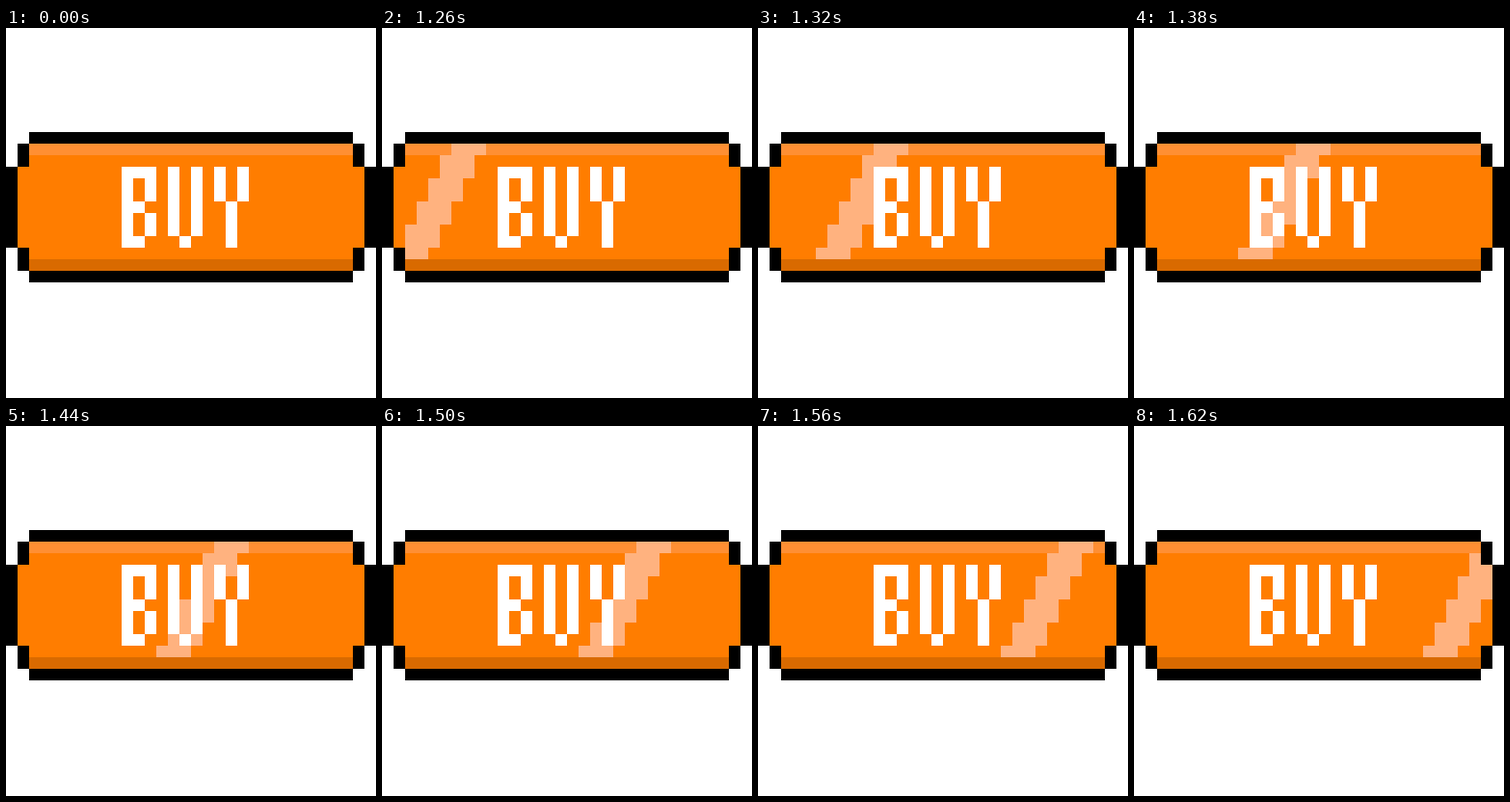
These frames come from a looping animation (384 px wide and 384 px high, 1680 ms). An HTML page:

```html
<!DOCTYPE html>
<html lang="en">
<head>
<meta charset="utf-8">
<title>Buy button</title>
<style>
  html, body { margin: 0; width: 100%; height: 100%; overflow: hidden; background: #fff; }
  svg { display: block; width: 100%; height: 100%; }
</style>
</head>
<body>
<!-- One unit is one big pixel: the stage is 32 by 32. -->
<svg viewBox="0 0 32 32" shape-rendering="crispEdges" role="img" aria-label="BUY">
  <defs>
    <clipPath id="face"><path d="M2 10H30V12H31V19H30V21H2V19H1V12H2Z"/></clipPath>
  </defs>
  <path d="M2 9H30V10H31V12H32V19H31V21H30V22H2V21H1V19H0V12H1V10H2Z"/>
  <g clip-path="url(#face)">
    <path fill="#ff7d00" d="M1 10H31V21H1Z"/>
    <path fill="#ff8f33" d="M2 10H30V11H2Z"/>
    <path fill="#d96a00" d="M2 20H30V21H2Z"/>
    <path id="shine" fill="#ffb27f"
      d="M6 10h3v1h-1v2h-1v2h-1v2h-1v2h-1v1h-3v-1h1v-2h1v-2h1v-2h1v-2h1z"/>
  </g>
  <g fill="#fff">
    <path fill-rule="evenodd" d="M10 12h3v3h-1v1h1v2h-1v1h-2zM11 13h1v2h-1zM11 16h1v2h-1z"/>
    <path d="M14 12h1v6h1v-6h1v6h-1v1h-1v-1h-1z"/>
    <path d="M18 12h1v3h1v-3h1v3h-1v4h-1v-4h-1z"/>
  </g>
</svg>
<script>
  const LOOP = 1680, SWEEP_START = 1260, STEP = 60, STRIDE = 4;

  const pose = (time, x) => ({
    offset: time / LOOP,
    transform: `translate(${x}px, 0px)`,
    easing: 'step-end'
  });

  // Rest out of sight on the left, then jump across the face.
  const poses = [pose(0, -12)];
  for (let i = 0; i < 7; i++) poses.push(pose(SWEEP_START + i * STEP, i * STRIDE));
  poses.push(pose(LOOP, -12));

  document.getElementById('shine').animate(poses, { duration: LOOP, iterations: Infinity });
</script>
</body>
</html>
```
